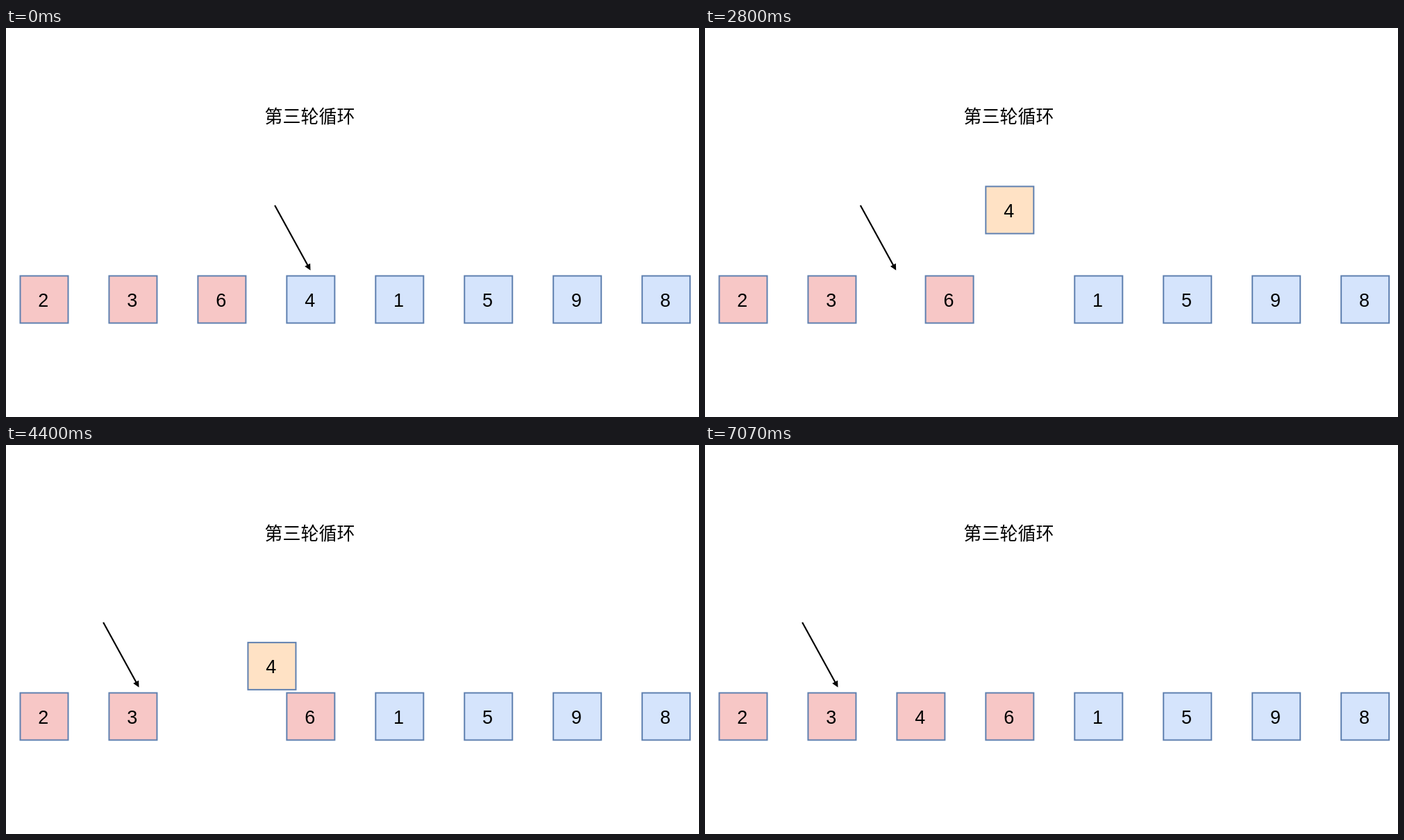
Recreate the animation shown at these times as an HTML page with a canvas. Size 998 by 561 pixels, loop 7.2 s.

```html
<!DOCTYPE html>
<html lang="zh-CN">
<head>
<meta charset="utf-8">
<title>第三轮循环</title>
<style>
html, body { margin: 0; width: 100%; height: 100%; overflow: hidden; background: #fff; }
canvas { display: block; }
</style>
</head>
<body>
<canvas id="stage" width="998" height="561"></canvas>
<script>
const ctx = document.getElementById('stage').getContext('2d');
const LOOP = 7200, TICK = 1000 / 15, MOVE = 1333;
const PITCH = 127.95, ROW_Y = 357.5, LIFT = 129;
const BLUE = [213, 228, 252], PINK = [247, 199, 198], ORANGE = [255, 226, 197];

const progress = (t, start, length) => Math.min(1, Math.max(0, (t - start) / length));
// Constant acceleration for the first half, constant braking for the second
const ease = u => u < 0.5 ? 2 * u * u : 1 - 2 * (1 - u) ** 2;
const move = (t, start) => ease(progress(t, start, MOVE));
const mix = (a, b, k) => a.map((v, i) => v + (b[i] - v) * k);

function drawBox(digit, slot, lift, color) {
  const x = 20.5 + slot * PITCH, y = ROW_Y - lift * LIFT;
  ctx.fillStyle = `rgb(${color.map(Math.round)})`;
  ctx.strokeStyle = '#5f80b0';
  ctx.lineWidth = 2;
  ctx.fillRect(x, y, 69, 68);
  ctx.strokeRect(x, y, 69, 68);
  ctx.fillStyle = '#000';
  ctx.font = '27px "Liberation Sans", sans-serif';
  ctx.textAlign = 'center';
  ctx.fillText(digit, x + 33.3, y + 44.5);
}

function drawArrow(x) {
  ctx.save();
  ctx.translate(x + 51.5, 349.5);
  ctx.rotate(Math.atan2(94, 51.5));
  ctx.strokeStyle = ctx.fillStyle = '#000';
  ctx.lineWidth = 2.2;
  ctx.beginPath();
  ctx.moveTo(-107, 0);
  ctx.lineTo(-6, 0);
  ctx.stroke();
  ctx.beginPath();
  ctx.moveTo(0, 0);
  ctx.lineTo(-9, -4.5);
  ctx.lineTo(-9, 4.5);
  ctx.fill();
  ctx.restore();
}

function draw(t) {
  const raise = move(t, 270), shift = move(t, 2265), insert = move(t, 3777);
  const tint = t < 2265 ? 0.84 * progress(t, 200, 1500) : 1;
  const keyColor = mix(mix(BLUE, ORANGE, tint), PINK, progress(t, 5110, 1090));

  ctx.fillStyle = '#fff';
  ctx.fillRect(0, 0, 998, 561);
  ctx.fillStyle = '#000';
  ctx.font = '26px "Noto Sans CJK SC", "Noto Sans CJK", sans-serif';
  ctx.textAlign = 'left';
  ctx.fillText('第三轮循环', 372.5, 137);

  drawBox('2', 0, 0, PINK);
  drawBox('3', 1, 0, PINK);
  drawBox('6', 2 + shift, 0, PINK);
  [...'1598'].forEach((digit, i) => drawBox(digit, 4 + i, 0, BLUE));
  drawBox('4', 3 - insert, raise - insert, keyColor);
  drawArrow(387 - 123.5 * (raise + shift));
}

function tick() {
  const t = performance.now() % LOOP;
  draw(Math.floor((t + 4) / TICK) * TICK);
  requestAnimationFrame(tick);
}
tick();
</script>
</body>
</html>
```
